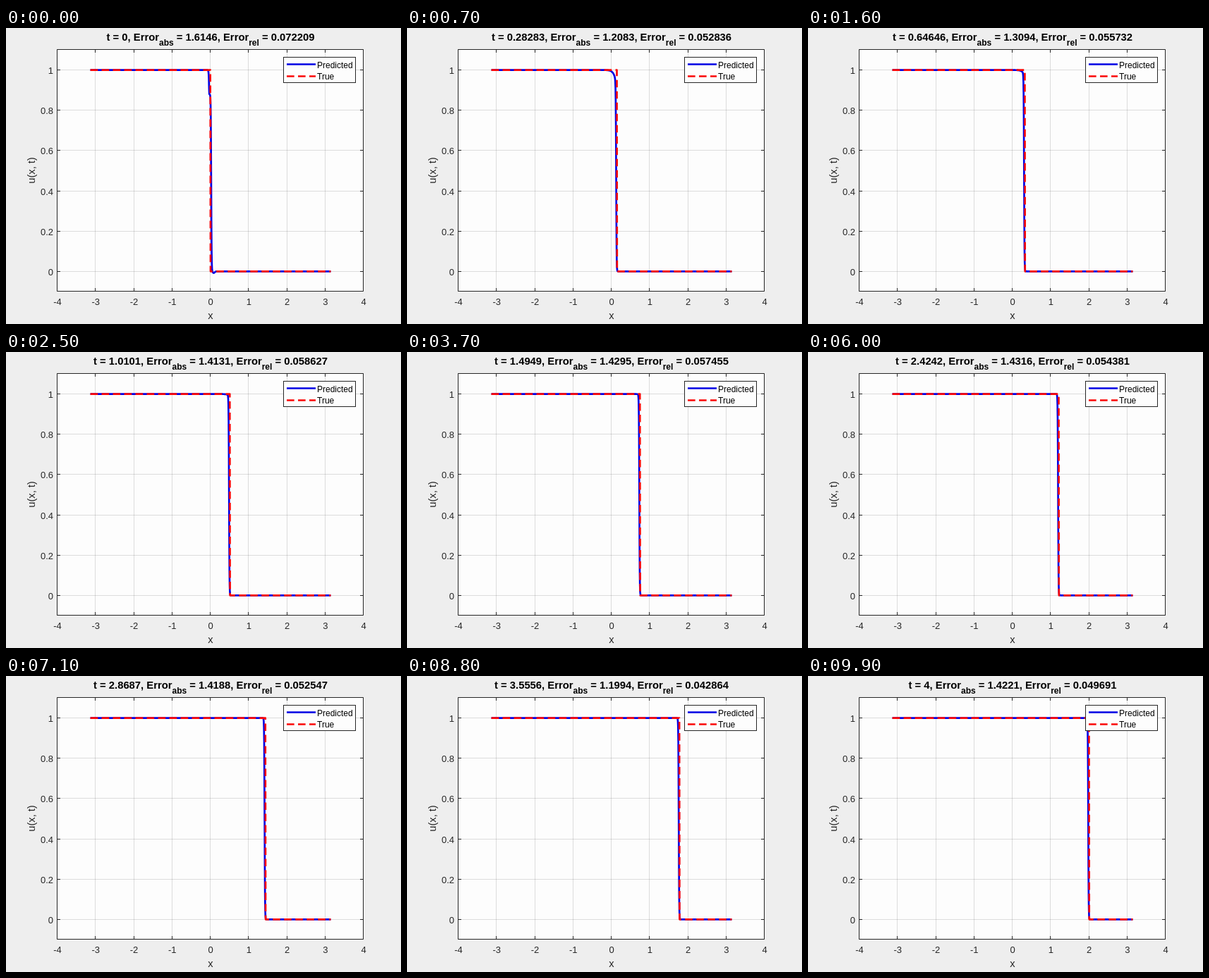
An HTML page that plays this animation: 560x420 px, repeating every 10 s.

```html
<!DOCTYPE html>
<html lang="en">
<head>
<meta charset="utf-8">
<title>Predicted and true step</title>
<style>
  html, body { margin: 0; width: 100%; height: 100%; overflow: hidden; background: #eee; }
  svg { display: block; width: 560px; height: 420px; }
  text { font-family: "Liberation Sans", Arial, sans-serif; fill: #262626; }
  .tick { font-size: 13px; }
  .label { font-size: 14.67px; text-anchor: middle; }
  .legend text { font-size: 12px; fill: #000; }
  .title { font-size: 14.8px; font-weight: bold; text-anchor: middle; fill: #000; white-space: pre; }
  .sub { font-size: 12px; }
  .line { fill: none; stroke-width: 2.67; stroke-linejoin: round; }
  .blue { stroke: #0000e4; }
  .red { stroke: #fa0808; stroke-dasharray: 10.67 5.33; }
  .grid { stroke: #262626; stroke-opacity: .15; }
  .axis { stroke: #262626; fill: none; }
</style>
</head>
<body>
<svg viewBox="0 0 560 420">
  <rect width="560" height="420" fill="#eee"/>
  <rect x="72.5" y="30.5" width="434" height="343" fill="#fdfdfd"/>
  <path class="grid" id="grid"/>
  <path class="axis" id="axis"/>
  <g class="tick" id="ticks"></g>
  <path class="line blue" id="pred"/>
  <path class="line red" id="true"/>
  <text class="label" x="290" y="413">x</text>
  <text class="label" transform="translate(41 202) rotate(-90)">u(x, t)</text>
  <text class="title" x="290" y="18"><tspan id="head"></tspan><tspan class="sub" dy="6.5">abs</tspan><tspan id="abs" dy="-6.5"></tspan><tspan class="sub" dy="6.5">rel</tspan><tspan id="rel" dy="-6.5"></tspan></text>
  <g class="legend">
    <rect x="393.5" y="41.5" width="102" height="36" fill="#fdfdfd" stroke="#262626"/>
    <path class="line blue" d="M398 51.5H439"/>
    <path class="line red" d="M398 68.5H439"/>
    <text x="441" y="56.5">Predicted</text>
    <text x="441" y="73">True</text>
  </g>
</svg>
<script>
const STEP = 100, FRAMES = 100, POINTS = 1000;
const $ = id => document.getElementById(id);
const px = x => 290 + x * 54.25;
const py = u => 345.3 - u * 285.7;
const short = v => String(Number(v.toPrecision(5)));

// Relative error at a few steps, linear in between
const errors = [[0, .072209], [7, .052836], [25, .058627], [48, .056381],
                [71, .052547], [88, .042864], [99, .049691]];

function relError(k) {
  const i = Math.max(1, errors.findIndex(([step]) => step >= k));
  const [k0, a] = errors[i - 1], [k1, b] = errors[i];
  return a + (b - a) * (k - k0) / (k1 - k0);
}

// Predicted u at d pixels from the shock: a soft step just behind it,
// with a dip on its shoulder and an undershoot that both fade away
function predicted(d, k) {
  const early = Math.exp(-k / 2);
  const step = 1 / (1 + Math.exp((d + 1.2 - 2.1 * early) / .3));
  const reach = Math.min(3, .4 + .4 * k);
  const dip = .12 * Math.exp(-k / 8) * Math.exp(Math.min(0, d + 2) / reach);
  const under = .008 * early * Math.exp(-((d - 4.5) ** 2) / 4);
  return (1 - dip) * step - under;
}

function addTick(label, x, y, anchor) {
  const el = document.createElementNS("http://www.w3.org/2000/svg", "text");
  el.setAttribute("x", x);
  el.setAttribute("y", y);
  el.setAttribute("text-anchor", anchor);
  el.textContent = label;
  $("ticks").append(el);
}

function drawAxes() {
  const snap = v => Math.floor(v) + .5;
  let grid = "", axis = "M72.5 30.5H506.5V373.5H72.5Z";
  for (let i = -4; i <= 4; i++) {
    const x = snap(px(i) - .5);
    if (Math.abs(i) < 4) grid += `M${x} 31V373`;
    axis += `M${x} 373.5v-4.5M${x} 30.5v4.5`;
    addTick(i, px(i), 392.5, "middle");
  }
  for (let i = 0; i <= 5; i++) {
    const y = snap(py(i / 5));
    grid += `M73 ${y}H506`;
    axis += `M72.5 ${y}h4.5M506.5 ${y}h-4.5`;
    addTick(i / 5, 67, y + 5, "end");
  }
  $("grid").setAttribute("d", grid);
  $("axis").setAttribute("d", axis);
}

function draw(k) {
  const t = 4 * k / (FRAMES - 1), shock = t / 2;
  const ones = Math.ceil(POINTS * (.5 + shock / (2 * Math.PI)) - 1e-9);
  const gridX = i => px(-Math.PI + 2 * Math.PI * i / POINTS);
  const left = px(-Math.PI), right = px(Math.PI);

  const rel = relError(k);
  $("head").textContent = `t = ${short(t)}, Error`;
  $("abs").textContent = ` = ${short(rel * Math.sqrt(ones))}, Error`;
  $("rel").textContent = ` = ${short(rel)}`;

  $("true").setAttribute("d",
    `M${left} ${py(1)}H${gridX(ones - 1)}L${gridX(ones)} ${py(0)}H${right}`);

  let curve = `M${left} ${py(1)}`;
  for (let d = -18; d <= 9; d += .3) curve += `L${px(shock) + d} ${py(predicted(d, k))}`;
  $("pred").setAttribute("d", `${curve}H${right}`);
}

let shown = -1;
const start = performance.now();
function tick() {
  const k = Math.floor((performance.now() - start) / STEP) % FRAMES;
  if (k !== shown) draw(shown = k);
  requestAnimationFrame(tick);
}
drawAxes();
tick();
</script>
</body>
</html>
```
